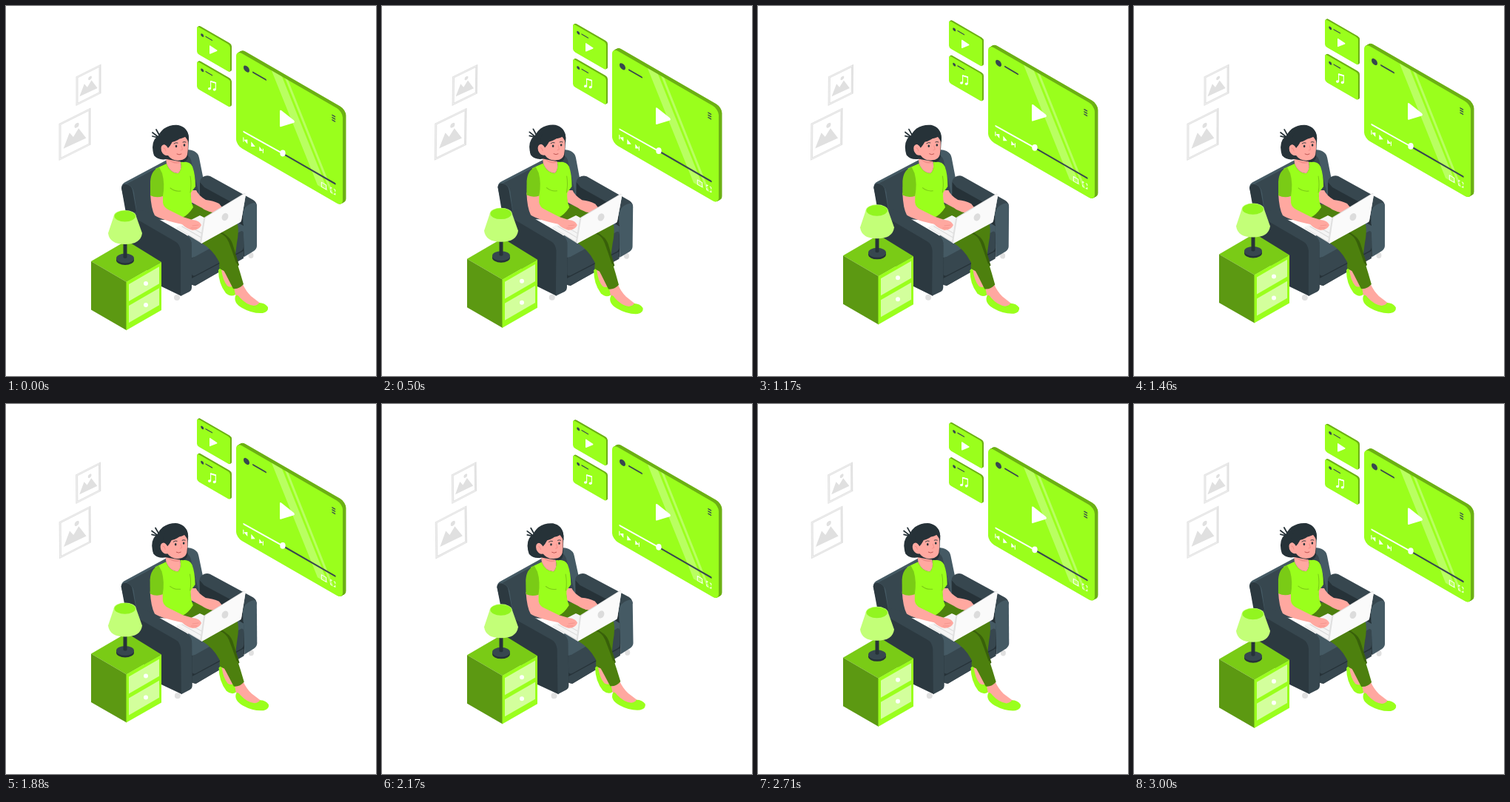
These frames come from a looping animation (500 by 500 pixels, 3.04 s). An HTML page with a canvas:

```html
<!DOCTYPE html>
<html lang="en">
<head>
<meta charset="utf-8">
<title>Watching at home</title>
<style>
html, body { margin: 0; width: 100%; height: 100%; overflow: hidden; background: #fff; }
canvas { display: block; width: 500px; height: 500px; }
</style>
</head>
<body>
<canvas id="stage"></canvas>
<script>
const LOOP = 3040, ISO = 0.577;
const LIME = '#9aff1c', LIME_MID = '#7acb16', LIME_SIDE = '#6cb014', LIME_DARK = '#5c9912';
const PANTS = '#4d800e', PANTS_DARK = '#38600a';
const INK = '#263238', SHADE = '#2c3940', SLATE = '#37474f', STEEL = '#455a64';
const SKIN = '#ffa8a0', SKIN_DARK = '#f2908a', GREY = '#e0e0e0', WHITE = '#fff';

const canvas = document.getElementById('stage');
const ctx = canvas.getContext('2d');
const dpr = window.devicePixelRatio || 1;
canvas.width = canvas.height = 500 * dpr;
ctx.lineCap = ctx.lineJoin = 'round';

function fill(color, d) {
  ctx.fillStyle = color;
  ctx.fill(new Path2D(d));
}
function line(color, width, d) {
  ctx.strokeStyle = color;
  ctx.lineWidth = width;
  ctx.stroke(new Path2D(d));
}
function oval(color, x, y, rx, ry = rx, turn = 0) {
  ctx.fillStyle = color;
  ctx.beginPath();
  ctx.ellipse(x, y, rx, ry, turn, 0, 7);
  ctx.fill();
}
function group(place, draw) {
  ctx.save();
  place();
  draw();
  ctx.restore();
}
// Runs draw on an isometric wall plane whose origin is x, y
function wall(x, y, draw, slope = ISO) {
  group(() => ctx.transform(1, slope, 0, 1, x, y), draw);
}

function picture(x, y, w, h) {
  const u = w / 42;
  wall(x, y, () => {
    ctx.fillStyle = GREY;
    ctx.fillRect(0, 0, w, h);
    ctx.fillStyle = '#f0f0f0';
    ctx.fillRect(0.9, 0.9, w - 2.6, h - 1.8);
    ctx.fillStyle = GREY;
    ctx.fillRect(2, 2, w - 4, h - 4);
    ctx.fillStyle = WHITE;
    ctx.fillRect(3, 3, w - 6, h - 6);
    ctx.scale(u, u);
    fill(GREY, 'M6 36 L14 19 L19 27 L26 19 L36 37 Z');
    oval(GREY, 23.5, 14, 3);
  }, -0.5);
}

function slab(x, y, w, h, r, depth) {
  const shape = new Path2D();
  shape.roundRect(0, 0, w, h, r);
  for (let d = depth; d >= 0; d -= 0.5) {
    wall(x + d, y - d * ISO, () => {
      ctx.fillStyle = d > 0 ? LIME_SIDE : LIME;
      ctx.fill(shape);
    });
  }
  return shape;
}

function card(y) {
  slab(258, y, 45, 37, 3, 2);
  wall(258, y, () => {
    oval(SLATE, 7.2, 8.4, 2);
    line(SLATE, 1.3, 'M12 7.500 H20.5');
  });
}

function screen() {
  const face = slab(311, 59.6, 144, 128.4, 8, 4.5);
  group(() => {
    ctx.transform(1, ISO, 0, 1, 311, 59.6);
    ctx.clip(face);
    ctx.transform(1, -ISO, 0, 1, -311, -59.6 + 311 * ISO);
  }, () => {
    fill('rgba(255,255,255,.3)', 'M358 85 L372 93 L435 250 L421 242 Z M376 95 L380 97 L443 255 L439 253 Z');
  });
  wall(311, 60, () => {
    oval(SLATE, 14, 17, 4);
    line(SLATE, 2, 'M23 16.5 H40');
    line(SLATE, 1.5, 'M130 12.5 H133.5 M130 15.7 H133.5 M130 18.9 H133.5');
    line(SLATE, 2.4, 'M63 103 H133.5');
    line(WHITE, 2.2, 'M10.5 104 L63 103');
  });
  wall(309.8, 60.6, () => {
    fill(WHITE, 'M10.500 110.500 H11.6 V116.500 H10.5 Z M16.500 110.500 V116.500 L11.6 113.5 Z');
    fill(WHITE, 'M21.500 110.300 L27 113.8 L21.500 117 Z');
    fill(WHITE, 'M32.500 110.500 L37 113.5 L32.500 116.500 Z M37 110.500 H38.1 V116.500 H37 Z');
    line(WHITE, 1, 'M116.500 110.500 H123 V116.500 H116.5 Z');
    line(WHITE, 1, 'M129 112 V110 H130.500 M133.500 110 H135 V112 M135 114.5 V116.500 H133.5 M130.500 116.500 H129 V114.5');
  });
  oval(WHITE, 374, 199, 3.7, 4.4);
  fill(WHITE, 'M370 142 Q370 140 372 141 L389 154.500 Q391 157 388.500 158 L372 163 Q370 164 370 162 Z');
}

function panels() {
  card(27);
  fill(WHITE, 'M275 54 Q275 53 276 53.500 L285 59.500 Q286 60.500 285 61 L276 64.700 Q275 65 275 64 Z');
  card(74.3);
  line(WHITE, 1.1, 'M276.600 111.500 V101.500 L283.300 103.500 V112.500');
  line(WHITE, 1.6, 'M276.600 102 L283.300 104');
  oval(WHITE, 275, 111.7, 2, 1.8);
  oval(WHITE, 281.7, 113, 2, 1.8);
  screen();
}

function chair() {
  oval(GREY, 231, 394, 4, 4);
  oval(GREY, 331, 337, 3.5, 4);
  // Backrest
  fill(STEEL, 'M156 246 Q156 240 162 237.500 L238 197 Q246 192 254 196 Q260 199 261 205 L268 240 L262 290 L165 287 Z');
  fill(SHADE, 'M156 246 Q157 240 163 241 Q170 243 171 249 L178 288 L163 285 Z');
  fill(SLATE, 'M163 240.500 L236 202 Q246 198 250 208 L260 250 L256 290 L178 288 L173 252 Q171 243 163 240.500 Z');
  // Right arm
  fill(INK, 'M262 238 L322 272 L322 339 L262 300 Z');
  fill(SLATE, 'M262 238 Q262 234 266 231 Q271 228 276 230 L334 262 Q339 265 339 271 L322 282 L321 274 L268 245 Z');
  fill(STEEL, 'M320 282 Q320 274 327 269 Q339 262 339 271 V324 Q339 328 335 331 L322 339 Z');
  // Seat
  fill(INK, 'M248 330 L321 295 V340 L256 378 L248 376 Z');
  fill(STEEL, 'M236 315 L300 285 L321 297 V307 L256 343 L248 338 Z');
  fill(SLATE, 'M251 342 Q251 339 255 339 L318 304 Q321 304 321 307 V326 Q321 329 318 331 L256 364 Q251 366 251 361 Z');
  fill(SLATE, 'M251 368 L321 331 V341 L257 377 Q251 379 251 374 Z');
  // Left arm
  fill(SHADE, 'M164 282 Q180 278 200 292 L237 323 V392 L208 378 L168 330 Z');
  fill(SLATE, 'M169 285 Q172 278 181 276 Q187 276 194 281 L243 309 Q250 313 251 321 L237 329 Q236 322 230 319 L180 290 Q174 286 169 285 Z');
  fill(SLATE, 'M236 331 Q235 322 229 318 L242 311 Q251 315 251 323 V381 Q251 384 248 386 L236 392 Z');
}

function legs() {
  // Far leg
  fill(LIME, 'M287 357 Q289 353 292 356 L304 372 L309 379 Q314 386 310 390 Q304 394 297 388 Q287 375 287 357 Z');
  fill(SKIN, 'M291 356 L302 358 L308 378 Q303 381 299 378 Q293 371 291 356 Z');
  fill(PANTS, 'M212 270 Q232 272 252 268 L284 272 L313 295 Q315 305 312 320 L307 358 Q296 361 288 354 L290 325 L268 320 Z');
  fill(PANTS_DARK, 'M288 307 Q301 308 306 321 L315 350 L306 358 L290 325 Z');
  // Near leg
  fill(SKIN, 'M308 380 L320 376 Q324 385 331 392 L344 402 Q338 410 324 406 Q312 398 310 390 Z');
  fill(LIME, 'M310 392 Q312 388 316 394 Q325 404 335 405 Q341 404 342 401 Q350 401 354 407 Q355 413 347 415 Q333 416 319 408 Q307 401 310 392 Z');
  fill(PANTS, 'M240 295 L290 304 Q299 309 302 318 Q312 344 321 376 Q315 383 307 382 Q297 362 287 344 Q280 330 263 319 Z');
  line(PANTS_DARK, 2, 'M289 306 Q298 309 302 319 Q307 332 312 347');
}

function torso() {
  // Far arm
  fill(SKIN, 'M249 249 L257 249 Q260 256 270 262 Q280 263 288 267 L292 272 L280 279 Q270 277 265 273 L250 265 Z');
  fill(LIME, 'M202 220 Q208 217 217 213 Q222 226 233 226 Q238 220 236 211 Q248 209 252 217 Q256 228 256 244 L250 252 Q249 262 253 272 Q246 283 238 286 Q224 281 212 273 Q210 258 211 240 Z');
  line(LIME_MID, 1, 'M222 246 Q228 251 236 250');
  line(LIME_MID, 1, 'M249 230 Q251 241 249 252');
  // Neck
  fill(SKIN, 'M215 196 L235 206 L236 212 Q238 220 233 226 Q222 226 217 213 Z');
  fill(SKIN_DARK, 'M219 207 Q226 212 234 210 L235 212 Q226 215 219 207 Z');
}

function laptop() {
  fill(GREY, 'M230 300 L263 320 L272 290 L264 284 Z');
  fill('#f5f5f5', 'M230 299 L264 319 L272 288 L262 283 Z');
  line('#d8d8d8', 1, 'M238 298 L264 313 M243 295 L266 308');
  fill(SKIN, 'M268 273 Q280 268 290 272 Q284 280 275 278 Z');
}

function nearArm() {
  fill(SKIN, 'M195 253 L212 254 L212 266 Q213 272 219 275 L239 285 L252 289 Q262 290 264 296 Q261 303 252 303 Q244 301 238 295 Q210 289 201 283 Q196 274 195 253 Z');
  line(SKIN_DARK, 0.8, 'M252 297 L260 296 M250 300 L258 300');
  fill(LIME_MID, 'M207 218 Q196 222 195 237 V256 Q203 260 212 257 Q215 240 211 226 Z');
}

function lid() {
  fill(GREY, 'M267 288 Q267 286 269 285 L322 253 Q324 253 324 255 L318 290 L264 321 L262 319 Z');
  fill('#fafafa', 'M269 288 Q269 286 271 285 L322 254 Q324 253 324 255 L318 290 Q318 291 317 292 L264 321 Z');
  oval('#dcdcdc', 296, 285, 4.2, 5.3, 0.45);
}

function head() {
  line(INK, 1.8, 'M207 178 L198 171 M208 176 L203 167 M206 178 L198 176');
  oval(INK, 206.5, 191, 8.5, 14.5);
  fill(INK, 'M217 207 Q206 209 200 202 Q197 195 202 183 Q206 172 213 166 Q222 160 233 161 Q246 164 247 178 L246 200 Q247 209 240 211 L228 209 Z');
  fill(SKIN, 'M210 196 Q208 188 214 187 Q218 188 219 191 Q224 187 227 178 Q235 182 245 175 Q247 188 245 201 Q243 208 235 208.500 Q225 210 219 202 Q213 203 210 196 Z');
  fill(INK, 'M213 187 Q212 174 221 167 Q232 160 242 167 Q248 171 247 184 Q244 179 240 174 Q234 182 224 184 Q222 189 219 192 Q216 187 213 187 Z');
  oval(INK, 230, 189.5, 1.3, 1.7);
  oval(INK, 241, 188, 1.3, 1.7);
  line(INK, 0.9, 'M227 186 Q229 184 232 185 M239 184 Q241 183 243 184');
  line(SKIN_DARK, 1, 'M237 189 L238.500 194 L236 195 M213 192 Q215 192 216 196');
  line('#b94d4b', 0.9, 'M231 200 Q234 202 237 200');
}

function woman() {
  chair();
  legs();
  torso();
  laptop();
  nearArm();
  lid();
  head();
}

function cabinet() {
  fill(LIME_MID, 'M115 345 L163 317 L210 346 L163 373 Z');
  fill(LIME_DARK, 'M115 345 L163 373 V438.200 L115 410.500 Z');
  fill(LIME, 'M162.500 373 L210 346 V411 L162.500 438.200 Z');
  for (const y of [376, 405]) {
    wall(166, y, () => {
      ctx.fillStyle = '#d3ff9c';
      ctx.fillRect(0, 0, 41, 23);
    }, -ISO);
    oval(WHITE, 189, y - 1, 3);
  }
}

function lamp() {
  oval(INK, 161, 343.5, 12, 6.5);
  oval(SLATE, 161, 341, 12, 6.5);
  fill(INK, 'M158.500 315 H163.500 V340 Q161 342 158.500 340 Z');
  fill('#c3ff78', 'M146 283 L138 307 Q140 322 161 322 Q182 322 184 307 L175.500 283 Z');
  oval('#c3ff78', 160.7, 284, 15, 8);
  oval('#92f520', 160.7, 284, 14.2, 7.4);
}

function turnAbout(x, y, angle) {
  ctx.translate(x, y);
  ctx.rotate(angle);
  ctx.translate(-x, -y);
}

function frame(now) {
  const p = (now % LOOP) / LOOP;
  const lift = -10 * (1 - Math.abs(1 - 2 * p));
  // Linear swing 0, +1, 0, -1, 0 degrees
  const swing = p < 0.25 ? 4 * p : p < 0.75 ? 2 - 4 * p : 4 * p - 4;
  const angle = swing * Math.PI / 180;

  ctx.setTransform(dpr, 0, 0, dpr, 0, 0);
  ctx.fillStyle = WHITE;
  ctx.fillRect(0, 0, 500, 500);
  group(() => turnAbout(99.5, 144, angle), () => {
    picture(94.5, 95.5, 34, 39.5);
    picture(71.5, 159, 43, 50);
  });
  group(() => ctx.translate(0, lift), panels);
  group(() => turnAbout(255, 288, angle), woman);
  group(() => ctx.translate(0, lift), () => {
    cabinet();
    lamp();
  });
  requestAnimationFrame(tick);
}

const start = performance.now();
function tick() {
  frame(performance.now() - start);
}
tick();
</script>
</body>
</html>
```
